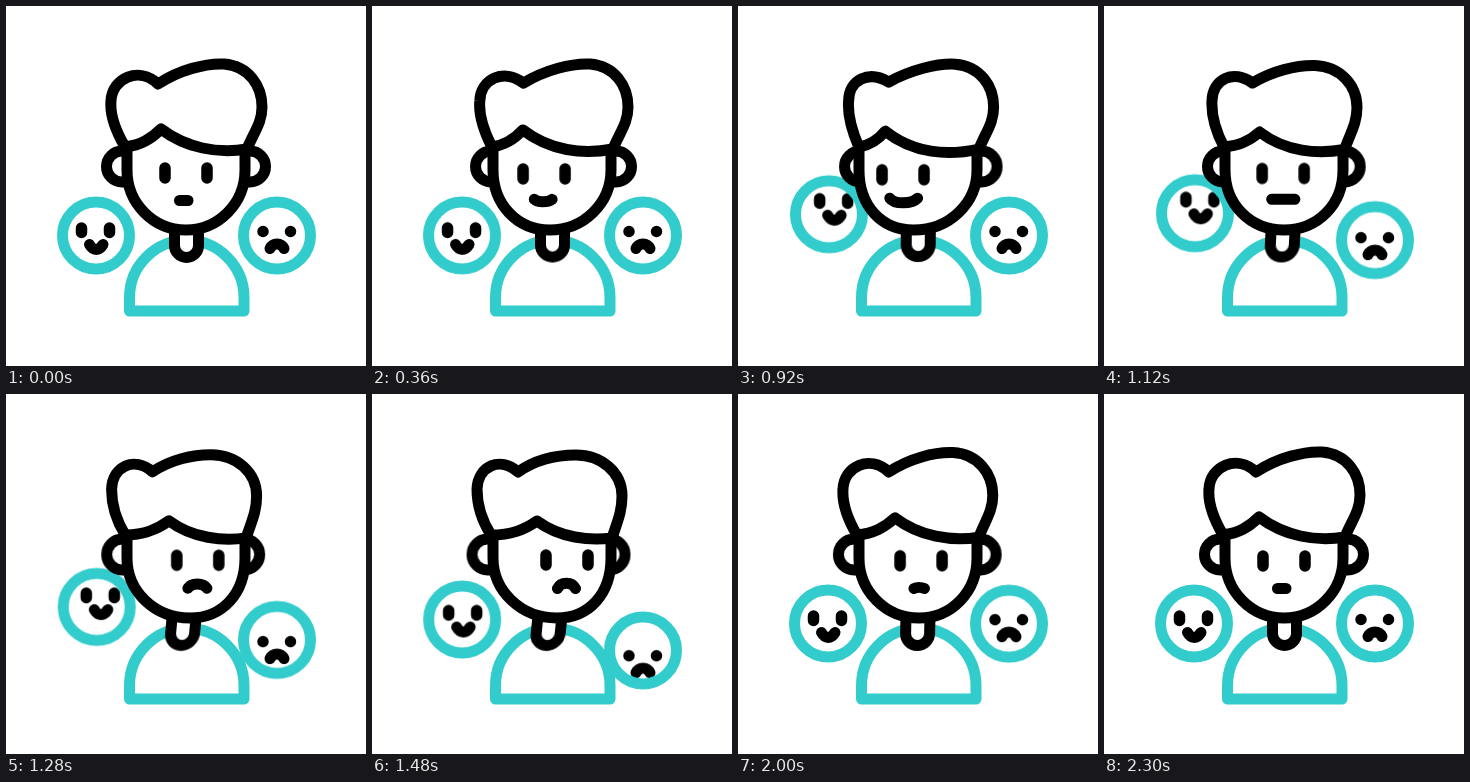
Recreate the animation shown at these times as an HTML page without scripts. Size 360 by 360 pixels, loop 2.4 s.

```html
<!DOCTYPE html>
<html lang="en">
<head>
<meta charset="utf-8">
<title>Mood swing</title>
<style>
  html, body { margin: 0; width: 100%; height: 100%; overflow: hidden; background: #fff; }
  svg { display: block; width: 100vw; height: 100vh; }
  .line { fill: none; stroke: #000; stroke-width: 11; stroke-linecap: round; stroke-linejoin: round; }
  .solid { fill: #fff; }
  .teal { stroke: #3cc; }
  .dots { stroke-width: 11.5; }

  /* Head: neutral, turned left and happy, turned right and sad, neutral */
  .turn, .hair, .jaw, .mouth { animation: turn 2400ms cubic-bezier(.65, 0, .35, 1) infinite; }
  .hair { animation-name: hair; }
  .jaw { animation-name: jaw; }
  .mouth { animation-name: mouth; }
  .neck { transform-origin: 0 222px; }
  @keyframes turn {
    0%, 95.8%, 100% { transform: none; }
    30.8% { transform: translate(var(--left, 0px), var(--left-y, 0px)); }
    62.5% { transform: translate(var(--right, 0px), var(--right-y, 0px)) skewX(var(--lean, 0deg)); }
  }
  @keyframes hair {
    0%, 95.8%, 100% { d: path("M119 141C108 122 104 106 105 95C106 72 133 60 152 78C173 64 200 57 218 58C243 60 256 80 256 101C256 117 248 126 241 143C212 148 180 142 155 123C145 133 135 139 119 141Z"); }
    30.8% { d: path("M121 141C113 122 110 106 111 95C111 74 131 64 151 76C173 64 200 57 218 58C243 60 256 80 256 101C256 117 248 126 241 143C210 150 175 148 146 125C140 133 132 139 121 141Z"); }
    62.5% { d: path("M119 141C107 122 105 106 105 95C106 72 128 62 146 78C163 66 185 61 204 61C229 61 250 78 250 102C250 117 246 126 240 144C218 147 188 144 165 127C152 136 139 141 119 141Z"); }
  }
  @keyframes jaw {
    0%, 95.8%, 100% { d: path("M121 141V164C121 197 147 224 180 224C213 224 239 197 239 164V141"); }
    30.8% { d: path("M121 141V164C121 200 143 224 175 224C211 224 239 197 239 164V141"); }
    62.5% { d: path("M121 141V164C121 197 149 224 185 224C217 224 239 200 239 164V141"); }
  }
  @keyframes mouth {
    0%, 95.8%, 100% { d: path("M173.500 194.500C176 194.500 179 194.500 182 194.500"); }
    30.8% { d: path("M149.500 192C154 199 172 199 178 192"); }
    62.5% { d: path("M185.500 194.500C189 187.500 200 187.500 203.500 194.500"); }
  }

  /* Side bubbles: the inner face drifts further than its ring */
  .rise, .sink { animation: rise 2400ms ease-in-out infinite; }
  .sink { animation-name: sink; }
  @keyframes rise {
    0%, 13.8%, 68.6%, 100% { transform: none; }
    43.3%, 45% { transform: translate(var(--x), var(--y)); }
  }
  @keyframes sink {
    0%, 39.8%, 84.4%, 100% { transform: none; }
    64.2% { transform: translate(var(--x), var(--y)); }
  }
</style>
</head>
<body>
<svg viewBox="0 0 360 360">
  <g class="line">
    <path class="teal solid" d="M123.500 305V291.500A57.250 57.250 0 0 1 238 291.500V305Z"/>

    <g class="rise" style="--x:1px;--y:-22.500px">
      <circle class="solid" cx="90" cy="229.500" r="33.500" stroke="none"/>
      <g class="rise" style="--x:5.500px;--y:-8.500px">
        <path class="dots" d="M75.500 222v4.500M103.500 222v4.500"/>
        <path d="M83.500 238.500C87 245 93 245 97 238.500"/>
      </g>
      <circle class="teal" cx="90" cy="229.500" r="33.500"/>
    </g>

    <g class="sink" style="--x:0px;--y:27.500px">
      <circle class="solid" cx="271" cy="229.500" r="33.500" stroke="none"/>
      <g class="sink" style="--x:0px;--y:9.500px">
        <path class="dots" d="M257 225.500h.01M284.500 225.500h.01"/>
        <path d="M264 242.500C267 236.500 275 236.500 278 242.500"/>
      </g>
      <circle class="teal" cx="271" cy="229.500" r="33.500"/>
    </g>

    <path class="turn neck solid" style="--right:-2.500px;--left-y:-1px;--lean:-6deg" d="M168.500 222V239.500A12 12 0 0 0 192.500 239.500V222"/>
    <path class="turn solid" style="--left:6.500px;--right:-.5px" d="M121 145H116A15.500 15.500 0 0 0 116 176H121"/>
    <path class="turn solid" style="--right:-6.500px" d="M239 145H244A15.500 15.500 0 0 1 244 176H239"/>
    <path class="jaw solid" d="M121 141V164C121 197 147 224 180 224C213 224 239 197 239 164V141"/>
    <path class="turn dots" style="--left:-17px;--left-y:2px;--right:15px;--right-y:-1px" d="M159 162v10M201 162v10"/>
    <path class="mouth" d="M173.500 194.500C176 194.500 179 194.500 182 194.500"/>
    <path class="hair solid" d="M119 141C108 122 104 106 105 95C106 72 133 60 152 78C173 64 200 57 218 58C243 60 256 80 256 101C256 117 248 126 241 143C212 148 180 142 155 123C145 133 135 139 119 141Z"/>
  </g>
</svg>
</body>
</html>
```
